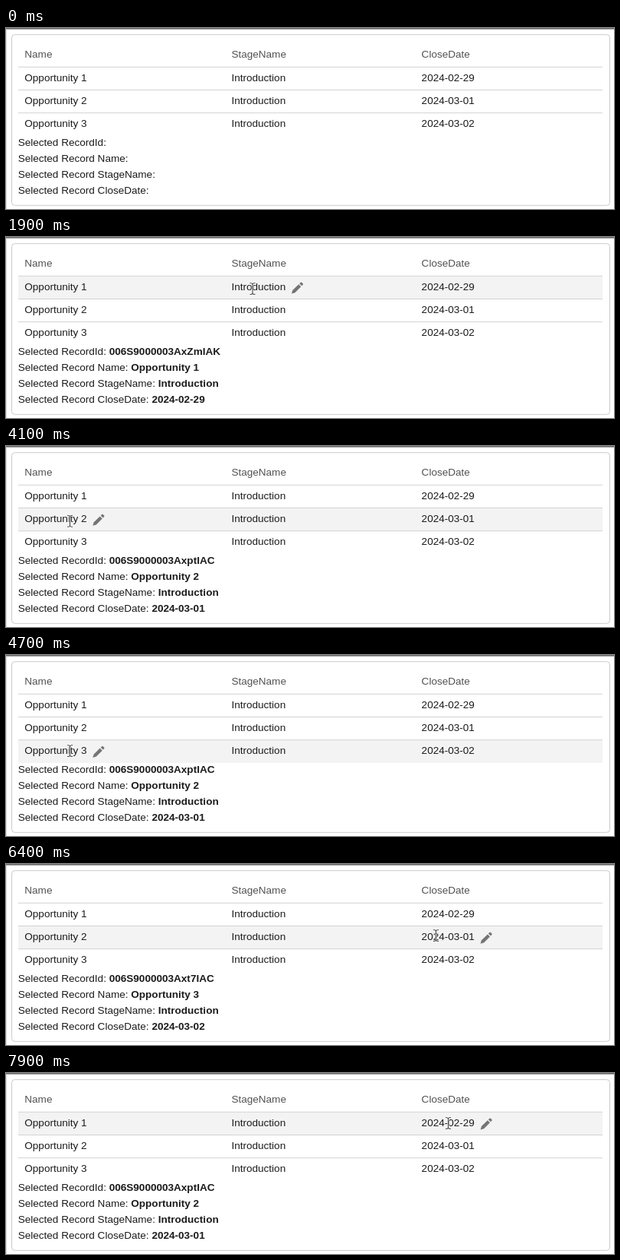
Recreate the animation shown at these times as an HTML page. Size 794 px wide and 238 px high, loop 8000 ms.

```html
<!DOCTYPE html>
<html lang="en">
<head>
<meta charset="utf-8">
<title>Record selection</title>
<style>
  html, body { margin: 0; width: 100%; height: 100%; overflow: hidden; background: #fff; }
  svg { display: block; }
  text { font: 13.55px "Liberation Sans", Arial, sans-serif; fill: #1c1c1c; }
  .head { fill: #525252; }
  .value { font-weight: 700; }
  .rule { stroke: #d2d2d2; }
  #cursor { fill: none; stroke: #404040; stroke-width: 1.1; }
  #cursor .halo { stroke: #fff; stroke-opacity: .75; stroke-width: 2.8; }
</style>
</head>
<body>
<svg width="794" height="238" viewBox="0 0 794 238">
  <defs>
    <path id="beam" d="M-3.5-7.5Q-.5-7.5 0-6.3Q.5-7.5 3.5-7.5M0-6.3V6.3M-3.5 7.5Q-.5 7.5 0 6.3Q.5 7.5 3.5 7.5"/>
  </defs>
  <rect width="794" height="1" fill="#626262"/>
  <rect y="1" width="794" height="1" fill="#a9a9a9"/>
  <rect y="2" width="794" height="1" fill="#ececec"/>
  <rect y="2" width="1" height="236" fill="#dedede"/>
  <rect x="7.5" y="8.7" width="781" height="224.6" rx="4" fill="#fff" stroke="#cbcbcb"/>
  <rect id="hover" x="16" width="763" height="30" fill="#f3f3f3"/>
  <g id="table"></g>
  <g id="details"></g>
  <g id="pencil" fill="#747474">
    <path d="M10.8 2.2 12.3.8q.8-.8 1.6 0l1.4 1.4q.8.8 0 1.6l-1.4 1.4Z"/>
    <path d="M9.8 3.2 12.9 6.3 5 14.2.5 15.5 1.9 11.1Z"/>
  </g>
  <g id="cursor">
    <use href="#beam" class="halo"/>
    <use href="#beam"/>
  </g>
</svg>
<script>
const LOOP = 8000, STEP = 100;
const ROW_TOP = 51, ROW_HEIGHT = 30.2;
const columns = [
  { name: 'Name', x: 24.3 },
  { name: 'StageName', x: 294.4 },
  { name: 'CloseDate', x: 542.6 }
];
const records = [['ZmIAK', '02-29'], ['ptIAC', '03-01'], ['t7IAC', '03-02']].map(([id, day], i) =>
  [`006S9000003Ax${id}`, `Opportunity ${i + 1}`, 'Introduction', `2024-${day}`]);
const labels = ['RecordId', 'Record Name', 'Record StageName', 'Record CloseDate'];

const clicks = [
  { at: 1900, record: 0 },
  { at: 3500, record: 1 },
  { at: 5100, record: 2 },
  { at: 6900, record: 1 }
];

// Each move eases from the previous point; bow bends its path sideways.
const entry = { at: 500, x: 6, y: 214 };
const moves = [
  { from: 400, to: 1100, x: 335, y: 61, bow: [180, 0] },
  { from: 1100, to: 1300, x: 322, y: 68 },
  { from: 2300, to: 3000, x: 83.5, y: 95, bow: [0, 75] },
  { from: 4000, to: 4400, x: 83.5, y: 121 },
  { from: 4600, to: 4700, x: 83.5, y: 126 },
  { from: 5500, to: 6400, x: 561.5, y: 94, bow: [0, 40] },
  { from: 7400, to: 7900, x: 577.5, y: 66, bow: [-45, 0] }
];

const el = id => document.getElementById(id);
const place = (node, x, y) => node.setAttribute('transform', `translate(${x} ${y})`);
const show = (node, on) => node.setAttribute('visibility', on ? 'visible' : 'hidden');
const ease = k => (1 - Math.cos(Math.PI * k)) / 2;

function add(parent, tag, attrs, content = '') {
  const node = document.createElementNS('http://www.w3.org/2000/svg', tag);
  for (const key in attrs) node.setAttribute(key, attrs[key]);
  node.textContent = content;
  return parent.appendChild(node);
}

columns.forEach((col, c) => {
  add(el('table'), 'text', { x: col.x, y: 39, class: 'head' }, col.name);
  col.cells = records.map((rec, r) =>
    add(el('table'), 'text', { x: col.x, y: 70 + r * 30 }, rec[c + 1]));
});
records.forEach((_, r) => {
  const y = ROW_TOP + r * ROW_HEIGHT + .3;
  add(el('table'), 'line', { x1: 16, x2: 779, y1: y, y2: y, class: 'rule' });
});

const values = labels.map((label, i) => {
  const line = add(el('details'), 'text', { x: 15.7, y: 155 + i * 21 }, `Selected ${label}: `);
  return add(line, 'tspan', { class: 'value' });
});

function cursorAt(t) {
  let { x, y } = entry;
  for (const { from, to, x: endX, y: endY, bow = [0, 0] } of moves) {
    if (t <= from) break;
    const k = ease(Math.min(1, (t - from) / (to - from)));
    const bend = Math.sin(Math.PI * k);
    x += (endX - x) * k + bow[0] * bend;
    y += (endY - y) * k + bow[1] * bend;
  }
  return { x, y };
}

function draw(t) {
  const click = clicks.filter(c => c.at <= t).pop();
  values.forEach((node, i) => {
    node.textContent = click ? records[click.record][i] : '';
  });

  const { x, y } = cursorAt(t);
  const visible = t >= entry.at;
  show(el('cursor'), visible);
  place(el('cursor'), x, y);

  const row = Math.floor((y - ROW_TOP) / ROW_HEIGHT);
  const hovered = visible && row >= 0 && row < records.length;
  show(el('hover'), hovered);
  show(el('pencil'), hovered);
  if (hovered) {
    const top = ROW_TOP + row * ROW_HEIGHT;
    const col = columns.filter(c => c.x - 8 <= x).pop();
    el('hover').setAttribute('y', top + .5);
    place(el('pencil'), col.x + col.cells[row].getComputedTextLength() + 7.2, top + 8);
  }
}

const start = performance.now();
function tick() {
  const t = (performance.now() - start) % LOOP;
  draw(Math.floor(t / STEP) * STEP);
  requestAnimationFrame(tick);
}
tick();
</script>
</body>
</html>
```
